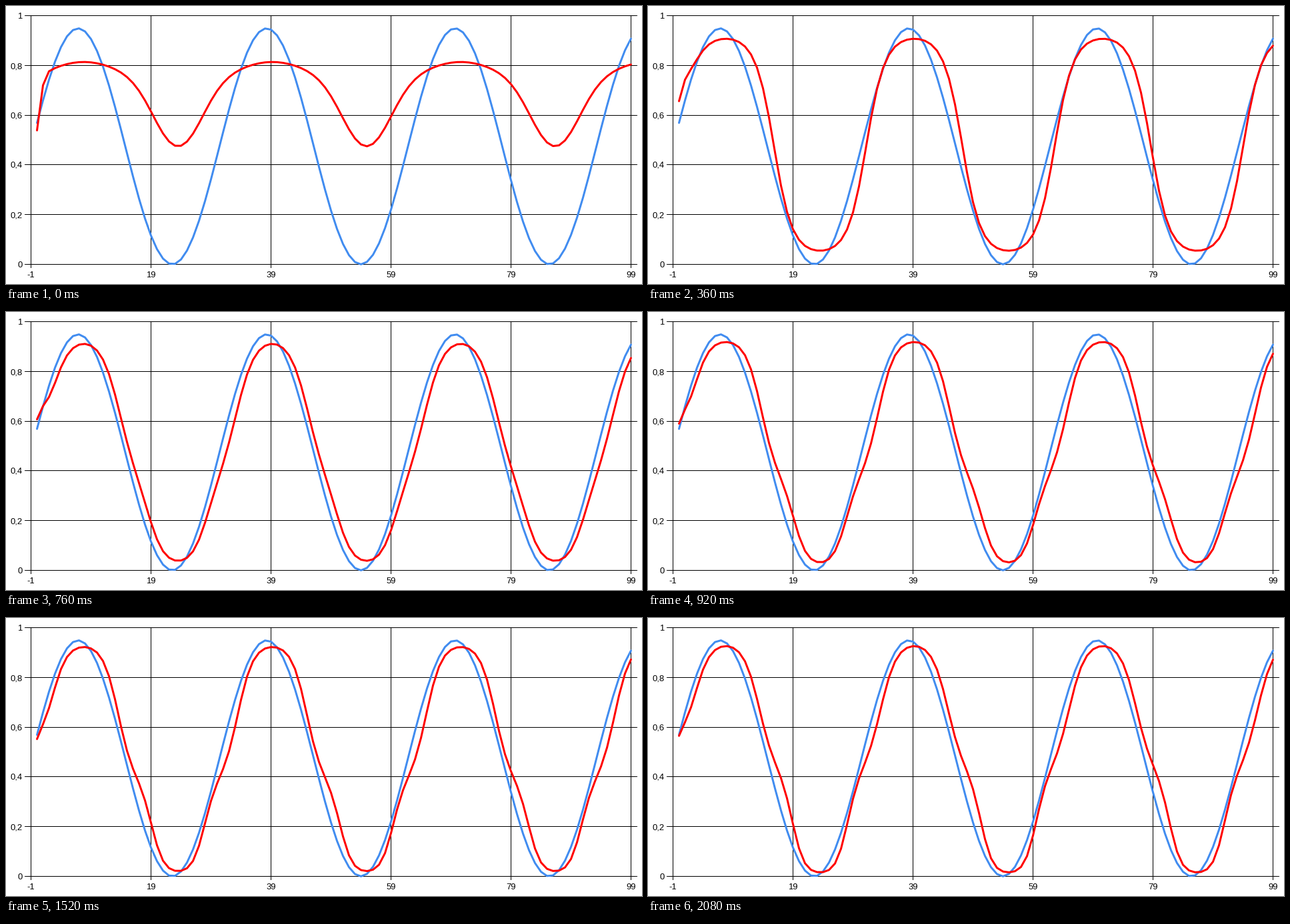
These frames come from a looping animation (954x418 px, 2.12 s). A matplotlib script:

```python
import numpy as np
import matplotlib.pyplot as plt
from matplotlib.animation import FuncAnimation

W, H, DPI = 954, 418, 64
PX = 72 / DPI                      # points per pixel
STEP, FRAMES = 40, 53
LAG = 0.19                         # phase delay of the learned wave
x = np.arange(100)
phase = 0.2 * (x + 1)
signal = np.sin(phase - LAG)

# Training stages: the output neuron's input is a quartic in the delayed
# signal, plus a kick that fades over the first few steps.
STAGES = np.array([0, 360, 600, 920, 1240, 2080])
QUARTIC = np.array([
    [1.04, 0.65, -0.35, 0.14, 0],
    [0, 2.85, -0.28, -0.28, 0],
    [-0.16, 1.85, -0.24, 0.79, 0],
    [-0.17, 1.54, 0.96, 1.38, -1.28],
    [-0.23, 1.41, 1.20, 1.67, -1.59],
    [-0.08, 1.30, 0.63, 2.03, -1.34],
])
KICK = [-0.89, 0.62, 0.65, 0.52, 0.40, 0.33]


def output(t):
    bump, eased = 0, t
    if t < STAGES[1]:              # fast start with an overshoot
        w = t / STAGES[1]
        bump = 0.65 * np.sin(np.pi * w) ** 2
        eased = STAGES[1] * (1 - np.exp(-3.2 * w)) / (1 - np.exp(-3.2))
    coef = [np.interp(eased, STAGES, c) for c in QUARTIC.T]
    span = 4 - 3.3 * np.exp(-t / 60)
    kick = np.interp(eased, STAGES, KICK) * np.exp(-x ** 2 / span)
    z = np.polynomial.polynomial.polyval(signal, coef) + kick + bump
    return 1 / (1 + np.exp(-z))


def to_x(v):
    return 46.5 + 9 * v


def to_y(v):
    return 388.4 - 373.5 * v


fig = plt.figure(figsize=(W / DPI, H / DPI), dpi=DPI, facecolor="white")
ax = fig.add_axes([0, 0, 1, 1])
ax.set(xlim=(0, W), ylim=(H, 0))
ax.axis("off")

grid = dict(color="black", lw=PX, solid_capstyle="butt", snap=False)
text = dict(family="Liberation Sans", size=13 * PX, color="black")

for i in range(6):
    y = np.floor(to_y(i / 5)) + 0.5
    ax.plot([28, 947], [y, y], **grid)
    label = f"{i / 5:g}".replace(".", ",")
    ax.text(24.5, y + 4.5, label, ha="right", va="baseline", **text)
for v in range(-1, 100, 20):
    ax.plot([to_x(v)] * 2, [14, 394], **grid)
    ax.text(to_x(v), 408, str(v), ha="center", va="baseline", **text)

curve = dict(lw=3 * PX, solid_capstyle="round", solid_joinstyle="round")
ax.plot(to_x(x), to_y(0.475 * (1 + np.sin(phase))), color="#418CF0", **curve)
red, = ax.plot([], [], color="#FF0000", **curve)


def draw(frame):
    red.set_data(to_x(x), to_y(output(frame * STEP)))
    return red,


anim = FuncAnimation(fig, draw, frames=FRAMES, interval=STEP, repeat=True,
                     repeat_delay=0, blit=False)
plt.show()
```
